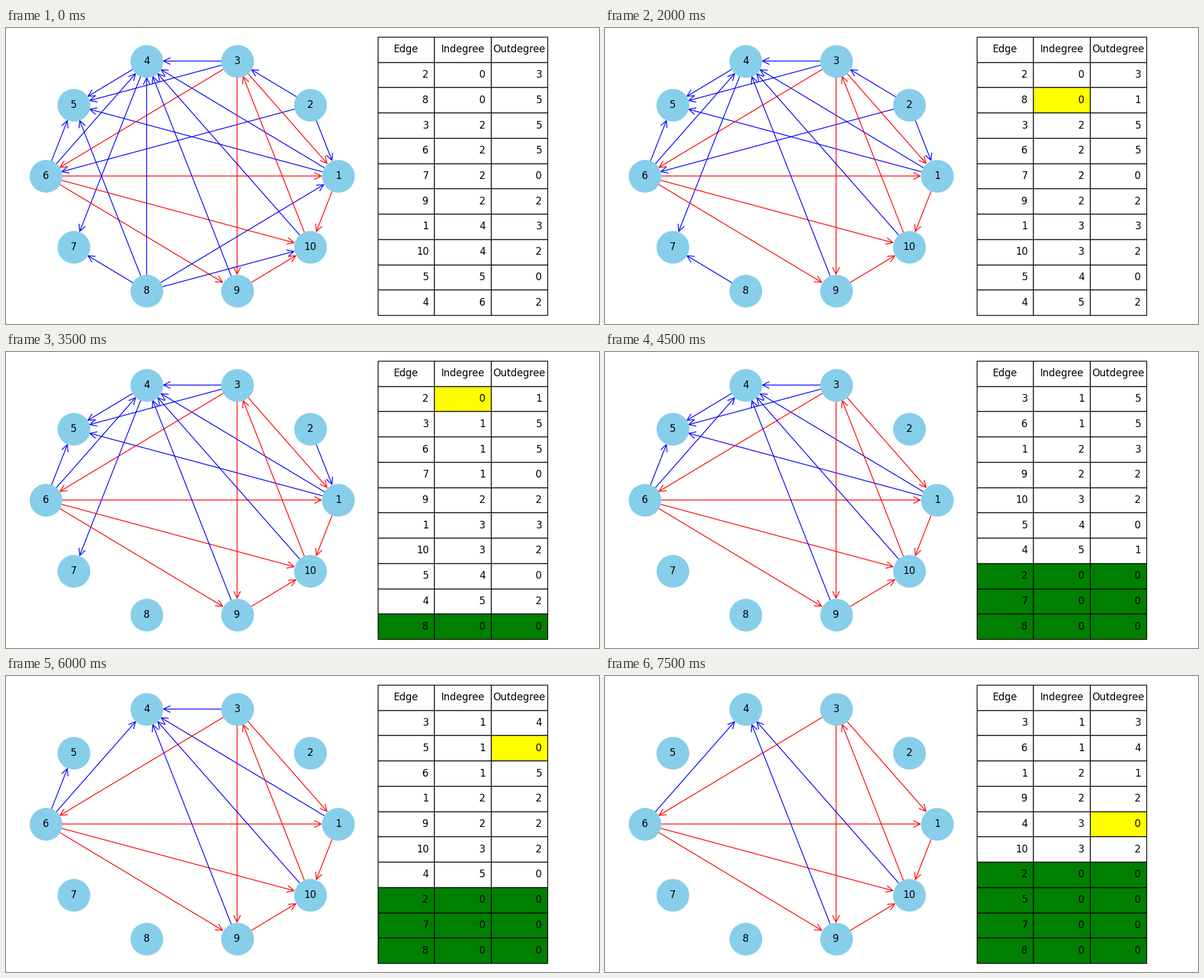
Animation, 1000 px wide and 500 px high, one loop 8000 ms. Source, as a matplotlib script:

```python
"""Peel sources, then sinks, off a directed graph until only its cycles remain."""
import math

import matplotlib.pyplot as plt
from matplotlib.animation import FuncAnimation
from matplotlib.patches import FancyArrowPatch

W, H, DPI = 1000, 500, 100
STEP_MS = 500
NODES = range(1, 11)
CORE = {1, 3, 6, 9, 10}  # the strongly connected part
LINKS = {
    1: (4, 5, 10),
    2: (1, 3, 6),
    3: (1, 4, 5, 6, 9),
    4: (5, 7),
    6: (1, 4, 5, 9, 10),
    8: (1, 4, 5, 7, 10),
    9: (4, 10),
    10: (3, 4),
}
EDGES = [(a, b) for a, heads in LINKS.items() for b in heads]

# Edges in the order they are cut: first out of sources, then into sinks.
SOURCE_CUTS = [(8, 1), (8, 4), (8, 10), (8, 5), (8, 7), (2, 3), (2, 6), (2, 1)]
SINK_CUTS = [(4, 7), (1, 5), (3, 5), (4, 5), (6, 5), (1, 4), (3, 4)]
CUTS = SOURCE_CUTS + SINK_CUTS

NODE_SIZE = 1500
SHRINK = math.sqrt(NODE_SIZE) / 2
POS = {n: (math.cos(math.tau * (n - 1) / 10), math.sin(math.tau * (n - 1) / 10))
       for n in NODES}


def degrees(edges):
    indeg = {n: sum(b == n for _, b in edges) for n in NODES}
    outdeg = {n: sum(a == n for a, _ in edges) for n in NODES}
    return indeg, outdeg


def finished(step):
    """Isolated nodes: in order of finishing at first, by number later."""
    done = []
    for k in range(1, step + 1):
        indeg, outdeg = degrees([e for e in EDGES if e not in CUTS[:k]])
        done += [n for n in NODES
                 if indeg[n] == outdeg[n] == 0 and n not in done]
    return done if step <= len(SOURCE_CUTS) else sorted(done)


def focus(step):
    """Node being emptied and the table column that singles it out."""
    if step == 0:
        return None, None
    tail, head = CUTS[step - 1]
    return (tail, 1) if step <= len(SOURCE_CUTS) else (head, 2)


def add_axes(fig, x, width):
    ax = fig.add_axes([x / W, 15 / H, width / W, 470 / H])
    ax.axis("off")
    return ax


def draw_graph(ax):
    ax.set_xlim(-1.21, 1.21)
    top = 1.21 * math.sin(math.tau / 5)
    ax.set_ylim(-top, top)
    arrows = {}
    for a, b in EDGES:
        color = "red" if a in CORE and b in CORE else "blue"
        arrows[a, b] = ax.add_patch(FancyArrowPatch(
            POS[a], POS[b], arrowstyle="->", mutation_scale=20,
            shrinkA=SHRINK, shrinkB=SHRINK, color=color, linewidth=1, zorder=1))
    xs, ys = zip(*POS.values())
    ax.scatter(xs, ys, s=NODE_SIZE, c="skyblue", linewidths=1, zorder=2)
    for n, (x, y) in POS.items():
        ax.text(x, y, str(n), size=12, ha="center", va="center", zorder=3)
    return arrows


def draw_table(ax):
    table = ax.table(cellText=[["0"] * 3 for _ in NODES],
                     colLabels=["Edge", "Indegree", "Outdegree"],
                     bbox=[0, 0, 0.8, 1])
    table.auto_set_font_size(False)
    table.set_fontsize(12)
    return table


plt.rcParams["font.family"] = "DejaVu Sans"
fig = plt.figure(figsize=(W / DPI, H / DPI), dpi=DPI, facecolor="white")
arrows = draw_graph(add_axes(fig, 15, 596.875))
table = draw_table(add_axes(fig, 626.875, 358.125))


def update(step):
    edges = [e for e in EDGES if e not in CUTS[:step]]
    for edge, arrow in arrows.items():
        arrow.set_visible(edge in edges)

    indeg, outdeg = degrees(edges)
    done = finished(step)
    active = sorted((n for n in NODES if n not in done),
                    key=lambda n: (indeg[n], n))
    marked = focus(step)
    for row, n in enumerate(active + done, start=1):
        for col, value in enumerate((n, indeg[n], outdeg[n])):
            cell = table[row, col]
            cell.get_text().set_text(str(value))
            if n in done:
                cell.set_facecolor("green")
            else:
                cell.set_facecolor("yellow" if (n, col) == marked else "white")
    return []


anim = FuncAnimation(fig, update, frames=len(CUTS) + 1, interval=STEP_MS,
                     init_func=lambda: update(0), repeat=True, repeat_delay=0)
plt.show()
```
